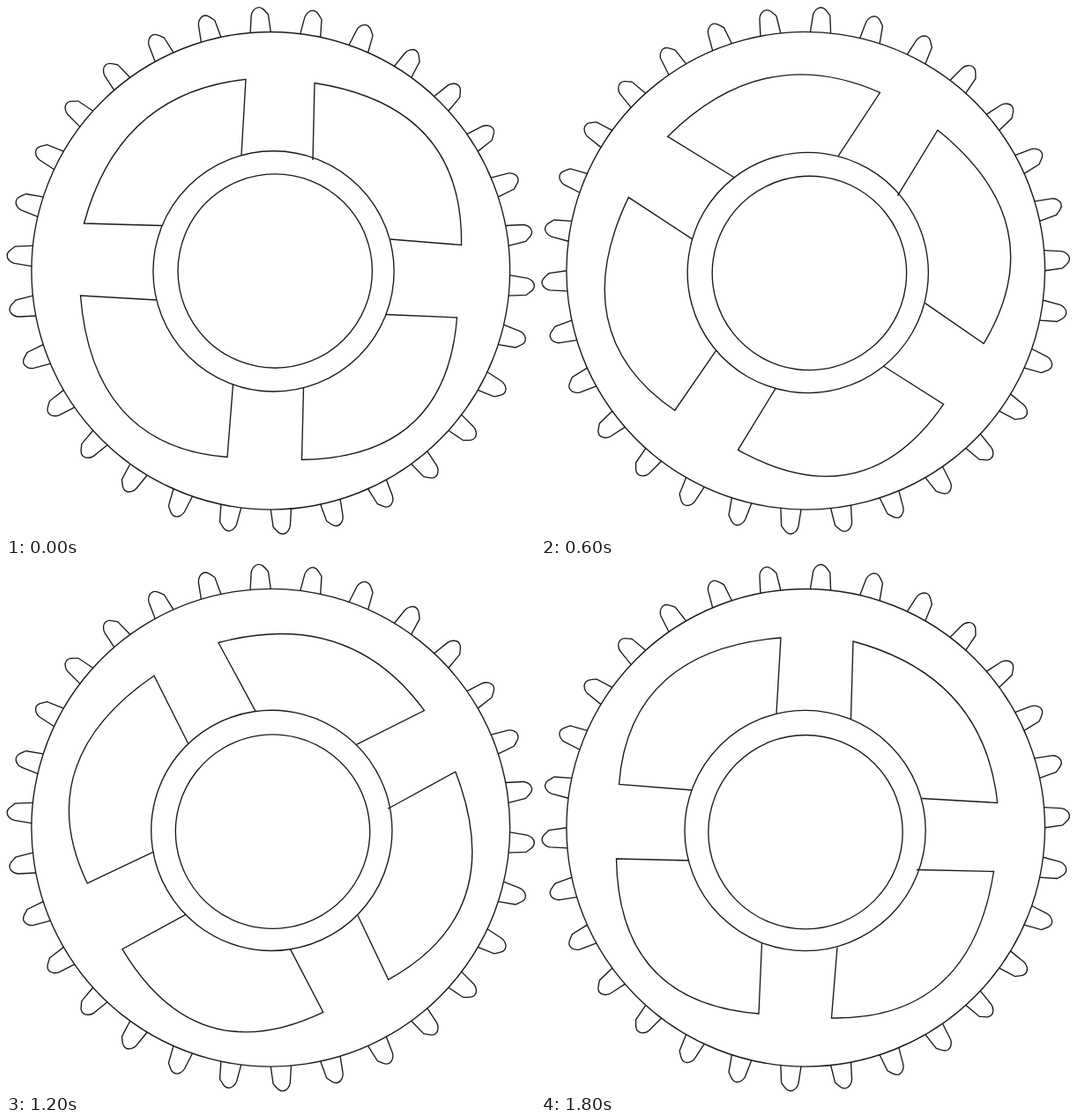
An HTML page for the animation above (1.9 s loop, 600 px wide and 601 px high).

```html
<!DOCTYPE html>
<html>
<head>
<meta charset="utf-8">
<style>
  html, body { margin: 0; width: 100%; height: 100%; overflow: hidden; background: #fff; }
  svg { display: block; }
</style>
</head>
<body>
<svg width="600" height="601" viewBox="0 0 600 601" fill="none" stroke="#1a1a1a" stroke-width="1.35">
  <g id="gear">
    <circle cx="300.25" cy="300.75" r="271.3"/>
    <circle cx="303.5" cy="301.4" r="136.6"/>
    <circle cx="305.2" cy="301" r="110.2"/>
    <path d="M267 169L272 83.3Q128.4 98.7 88.5 247L177 249.5"/>
    <path d="M348 175L350 87.5Q519 114 516.5 271.5L436 265"/>
    <path d="M431 350.5L511.5 354Q499 513 335.5 515.5L337.5 433"/>
    <path d="M170.5 334L84.5 329C93 438 146 504.5 251 512.5L257.5 430"/>
  </g>
</svg>
<script>
  const CX = 300.25, CY = 300.75, TEETH = 30;
  const STEP_MS = 100, STEPS = 19, STEP_DEG = 5;
  const gear = document.getElementById('gear');

  for (let i = 0; i < TEETH; i++) {
    const tooth = document.createElementNS('http://www.w3.org/2000/svg', 'path');
    tooth.setAttribute('d', 'M-11.6-271L-9.7-290.5C-9.2-294.5-5.5-299.5-1-299.5C3-299.5 5-296.5 9.6-291L11.6-271');
    tooth.setAttribute('transform', `translate(${CX} ${CY}) rotate(${i * 360 / TEETH - 2.45})`);
    gear.append(tooth);
  }

  const start = performance.now();
  function draw() {
    const step = Math.floor((performance.now() - start) / STEP_MS) % STEPS;
    gear.setAttribute('transform', `rotate(${step * STEP_DEG} ${CX} ${CY})`);
    requestAnimationFrame(draw);
  }
  draw();
</script>
</body>
</html>
```
